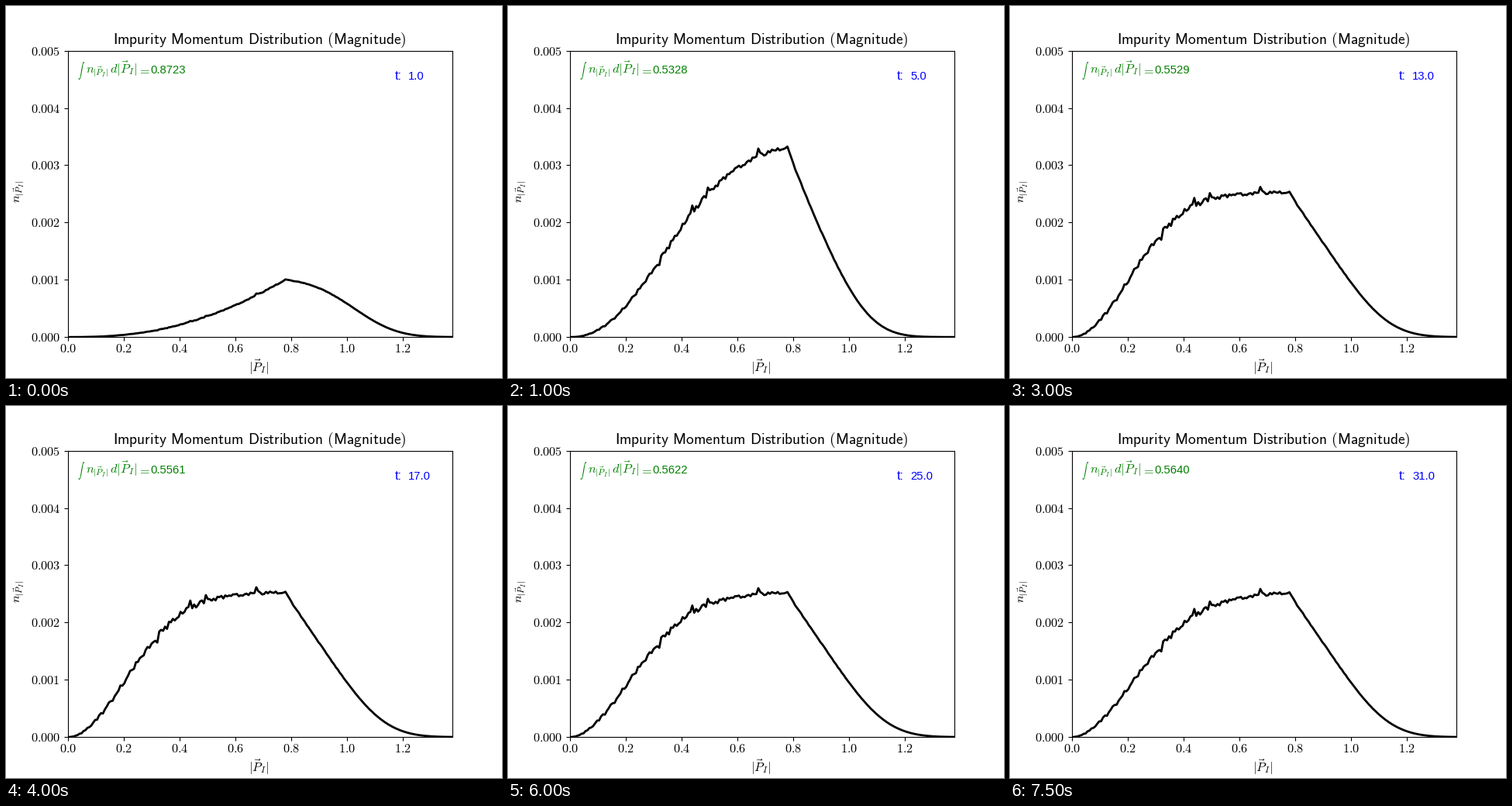
Write a matplotlib script that moves like this. It is 640 px wide and 480 px high and loops after 8 s.

```python
import numpy as np
import matplotlib.pyplot as plt
from matplotlib.animation import FuncAnimation

plt.rcParams.update({
    "mathtext.fontset": "cm",
    "font.family": "Liberation Sans",
    "font.size": 11.75,
})

FRAMES = 16
P_MAX = 1.379
P_EDGE = 0.78       # momentum where the tail begins
BIN = P_MAX / 198

# Integral at a few times
MASS = {1: .8723, 5: .5328, 9: .5435, 13: .5529, 17: .5561, 25: .5622, 31: .5640}

# Strongest bumps of the grid roughness: momentum -> relative height
SPIKES = {.322: -.06, .44: .06, .497: .045, .676: .04}

p = np.arange(199) * BIN


def grid_roughness():
    """Relative bin noise, fixed in time and fading towards large momenta."""
    rng = np.random.default_rng(4)
    noise = 0.006 / np.maximum(p, 0.06) * rng.uniform(-1.6, 1.6, p.size)
    noise[p > P_EDGE] *= 0.4
    for where, height in SPIKES.items():
        noise[round(where / BIN)] = height
    return noise


ROUGHNESS = grid_roughness()


def distribution(t):
    """Saturating power-law rise times a tail beyond P_EDGE."""
    s = t - 1
    height = 2.53 + 1.27 * np.exp(-(s / 5.5) ** 3)
    width = 0.26 + 0.002 * t + 0.99 * np.exp(-0.295 * s ** 1.3)
    power = 1.88 + 0.62 * np.exp(-s / 8)
    steep = 1 + 0.4 * np.exp(-((t - 5) / 3) ** 2)
    rise = 1 - np.exp(-(p / width) ** power)
    u = np.maximum(p - P_EDGE, 0)
    tail = np.exp(-steep * (3.2 * u + 25 * u ** 3))
    return 1e-3 * height * rise * tail * (1 + ROUGHNESS)


fig, ax = plt.subplots(figsize=(6.4, 4.8), dpi=100)
ax.set_xlim(0, P_MAX)
ax.set_ylim(0, 0.005)
xt = np.arange(7) * 0.2
yt = np.arange(6) * 0.001
ax.set_xticks(xt, [f"${v:.1f}$" for v in xt])
ax.set_yticks(yt, [f"${v:.3f}$" for v in yt])
ax.tick_params(axis="x", pad=2)


def label(x, y, text, **kw):
    """Text with its baseline at pixel (x, y), y counted from the top."""
    return fig.text(x / 640, 1 - y / 480, text, va="baseline", **kw)


words = ["Impurity", "Momentum", "Distribution", "(Magnitude)"]
label(327, 49.3, r"$\mathsf{" + r"\hspace{0.38}".join(words) + "}$",
      ha="center", fontsize=14)
label(326.5, 472.5, r"$|\vec{P}_I|$", ha="center")
label(19, 240, r"$n_{|\vec{P}_I|}$", ha="center", rotation=90,
      rotation_mode="anchor")

label(91.5, 86.5, r"$\int$", color="g", fontsize=6.3)
for x, part in [(103, r"n_{|\vec{P}_I|}"), (134, r"d|\vec{P}_I|"), (170.5, "=")]:
    label(x, 87, f"${part}$", color="g")
mass_text = label(186, 87, "", color="g", fontsize=10.7)
label(502, 95, "t:", color="b")
time_text = label(519.3, 95, "", color="b", fontsize=10.7)

line, = ax.plot([], [], "k-", lw=2)


def update(i):
    t = 1 + 2 * i
    line.set_data(p, distribution(t))
    mass = np.interp(t, list(MASS), list(MASS.values()))
    mass_text.set_text(f"{mass:.4f}")
    time_text.set_text(f"{t:.1f}")
    return line, mass_text, time_text


anim = FuncAnimation(fig, update, frames=FRAMES, interval=500,
                     repeat=True, repeat_delay=0)
plt.show()
```
